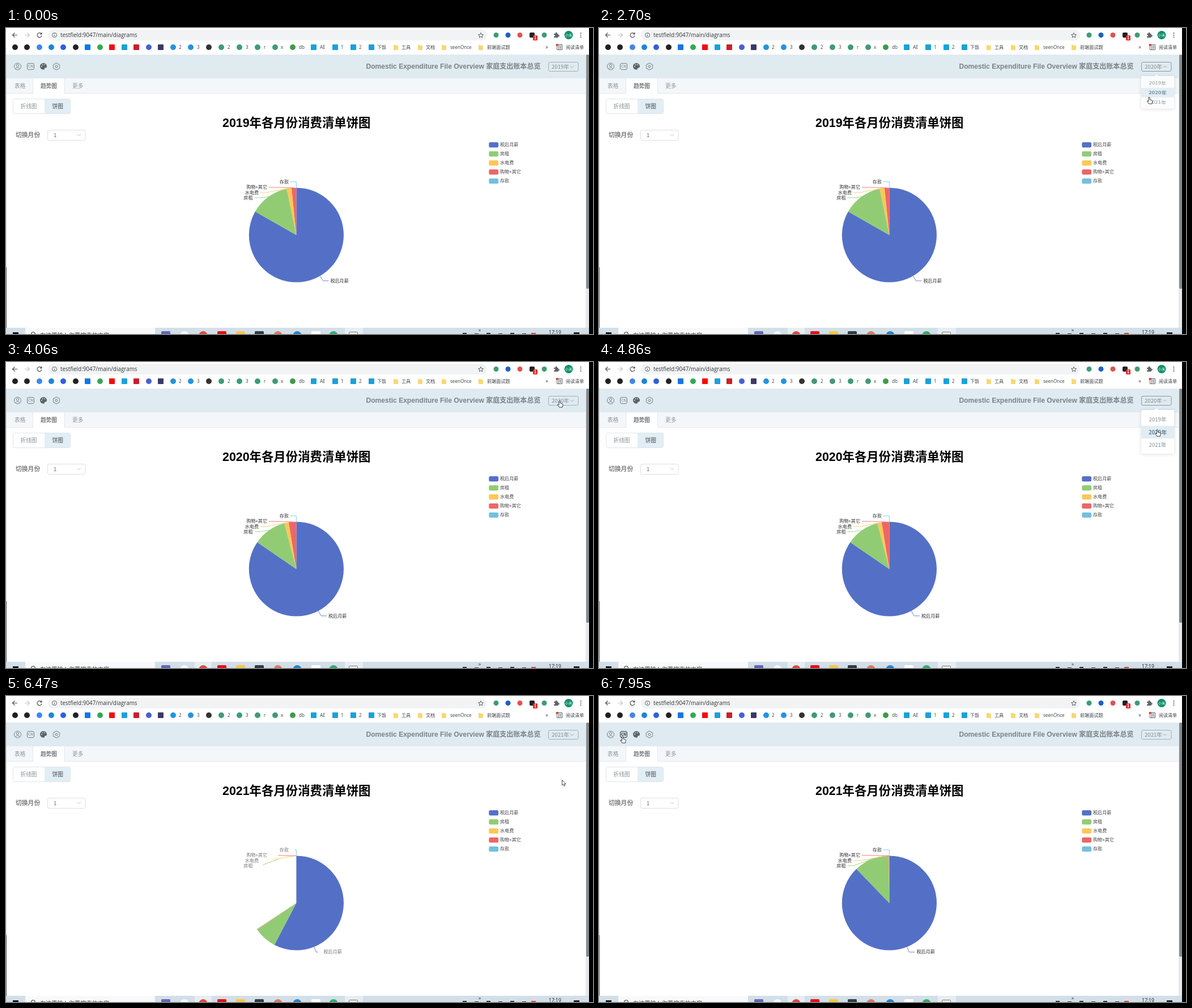
These frames come from a looping animation (1036x541 px, 8 s). An HTML page with a canvas:

```html
<!DOCTYPE html>
<html lang="zh-CN">
<head>
<meta charset="utf-8">
<title>消费饼图</title>
<style>
html, body { margin: 0; width: 100%; height: 100%; overflow: hidden; background: #fff; }
canvas { display: block; }
</style>
</head>
<body>
<canvas id="stage" width="1036" height="541"></canvas>
<script>
const g = document.getElementById('stage').getContext('2d');
const LOOP = 8000;
const CJK = '"Noto Sans CJK SC", "Noto Sans CJK JP", sans-serif';
const ARIAL = '"Liberation Sans", ' + CJK;
const UI = '"Open Sans", ' + CJK;
const GREY = '#767d82';

// ---------- helpers ----------
// y is the visual middle of the line
function text(s, x, y, size, color, { bold, align = 'left', font = CJK } = {}) {
  g.font = `${bold ? 'bold ' : ''}${size}px ${font}`;
  g.textAlign = align;
  g.fillStyle = color;
  g.fillText(s, x, y + size * 0.37);
}
function rect(x, y, w, h, fill, r = 0, stroke) {
  g.beginPath();
  g.roundRect(x, y, w, h, r);
  paint(fill, stroke);
}
function disc(x, y, r, fill, stroke, width) {
  g.beginPath();
  g.arc(x, y, r, 0, Math.PI * 2);
  paint(fill, stroke, width);
}
function paint(fill, stroke, width = 1) {
  if (fill) { g.fillStyle = fill; g.fill(); }
  if (stroke) { g.strokeStyle = stroke; g.lineWidth = width; g.stroke(); }
}
function path(d, x, y, fill, stroke, width = 1) {
  const p = new Path2D(d);
  g.save();
  g.translate(x, y);
  if (fill) { g.fillStyle = fill; g.fill(p); }
  if (stroke) { g.strokeStyle = stroke; g.lineWidth = width; g.stroke(p); }
  g.restore();
}
const clamp = v => Math.max(0, Math.min(1, v));
const smooth = p => p * p * (3 - 2 * p);
const outQuart = p => 1 - (1 - p) ** 4;
const outQuad = p => 1 - (1 - p) ** 2;
const cubicInOut = p => p < 0.5 ? 4 * p ** 3 : 1 - 4 * (1 - p) ** 3;

// ---------- browser ----------
// icon x, colour, shape (c circle, s square, f folder), label, label x
const bookmarks = [
  [16, '#1b1f23', 'c'], [37, '#222', 'c'], [59, '#4285f4', 'c'], [80, '#1a86d9', 'c'],
  [101, '#2f5fe0', 'c'], [123, '#222', 'c'], [144, '#0f77e6', 's'], [166, '#34a853', 'c'],
  [187, '#f00d0d', 's'], [209, '#1ba1d8', 's'], [230, '#cb1f27', 's'], [252, '#4461d7', 'c'],
  [273, '#3c3a66', 's'], [295, '#2493de', 'c', '2', 305], [326, '#2493de', 'c', '3', 337],
  [358, '#333', 'c'], [380, '#3f9b76', 'c', '2', 391], [412, '#3f9b76', 'c', '3', 423],
  [444, '#3f9b76', 'c', 'r', 455], [475, '#3f9b76', 'c', 'x', 485], [506, '#3f9c46', 'c', 'db', 517],
  [543, '#1ba1d8', 's', 'AE', 554], [581, '#1ba1d8', 's', '1', 591], [613, '#1ba1d8', 's', '2', 623],
  [645, '#1ba1d8', 's', '下饭', 655], [688, '#f8d775', 'f', '工具', 698], [731, '#f8d775', 'f', '文档', 741],
  [773, '#f8d775', 'f', 'seenOnce', 784], [838, '#f8d775', 'f', '前端面试题', 849],
];

function browser() {
  rect(0, 0, 1036, 541, '#fff');
  rect(74, 3, 775, 19, '#f1f3f4', 9.5);
  path('M4.5 0H-4M0 -4L-4 0L0 4', 15.5, 12.5, null, '#4c5054', 1.2);
  path('M-4.5 0H4M0 -4L4 0L0 4', 37.5, 12.5, null, '#c2c5c8', 1.2);
  path('M3.4 -2.2A4 4 0 1 0 4 1M4 -4.5V-1.5H1', 59, 12.5, null, '#4c5054', 1.2);
  disc(85.5, 12.5, 4, null, '#5f6368', 1);
  rect(85, 12, 1, 3, '#5f6368');
  rect(85, 10, 1, 1, '#5f6368');
  text('testfield:9047/main/diagrams', 96, 12.5, 9.9, '#34373b', { font: UI });
  path('M0 -4.5L1.3 -1.5L4.5 -1.3L2 .8L2.8 4L0 2.2L-2.8 4L-2 .8L-4.5 -1.3L-1.3 -1.5Z', 838, 13, null, '#5f6368', 1);
  disc(865, 12.5, 4.5, '#3f9b76');
  disc(886, 12.5, 4.5, '#1f5fc4');
  disc(907, 12.5, 4.5, '#e05252');
  rect(924, 8, 9, 9, '#222', 2);
  rect(930, 13, 8, 9, '#e02b2b', 1.5);
  text('1', 934, 17.5, 7, '#fff', { align: 'center', bold: true });
  disc(950, 12.5, 4.5, '#3f9b76');
  path('M-4 -2H-1.4A1.6 1.6 0 1 1 1.4 -2H3.6V.4A1.5 1.5 0 1 1 3.6 3V5H-4V2.6A1.4 1.4 0 1 0 -4 .2Z', 971, 12, '#5f6368');
  disc(993, 12.5, 7.5, '#12906c');
  text('小禾', 993, 12.5, 6.2, '#fff', { align: 'center' });
  for (let i = -1; i < 2; i++) disc(1014.5, 12.5 + i * 3.6, 1, '#4c5054');

  for (const [x, color, shape, label, labelX] of bookmarks) {
    if (shape === 'c') disc(x, 34, 5, color);
    if (shape === 's') rect(x - 5, 29, 10, 10, color, 1);
    if (shape === 'f') path('M-4 -4H-.5L.5 -3H4V5H-4Z', x, 34, color);
    if (label) text(label, labelX, 34.5, 8.1, '#3c4043', { font: UI });
  }
  text('»', 952, 33.5, 10, '#4c5054', { font: UI });
  path('M-4.5 -4.5H4.5V4.5H-4.5ZM-1.5 -4.5V4.5M0 -2H3M0 0H3M0 2H3', 977, 34, null, '#5f6368', 1);
  disc(972.5, 30, 2, '#d93025');
  text('阅读清单', 988, 34.5, 8, '#3c4043');
}

function taskbar(t) {
  rect(0, 530, 1029, 11, '#d3dfe8');
  rect(34, 530, 229, 11, '#f8f9fa');
  rect(12, 538, 10, 3, '#111');
  disc(48, 541, 3.3, null, '#333', 1.1);
  text('在这里输入你要搜索的内容', 60, 543, 10.2, '#444');
  rect(598, 530, 32, 11, '#e6eef3');
  if (t > 2200) rect(333, 530, 30, 11, '#e6eef3');
  const squares = [[282, '#6467b5'], [381, '#e60f17'], [414, '#f5c84b'], [447, '#333a40'], [547, '#fff']];
  for (const [x, color] of squares) rect(x - 8, 536, 16, 9, color, 1.5);
  const discs = [[315, '#f4faf8'], [348, '#dd4b3e'], [480, '#d97a62'], [514, '#2384c8'], [578, '#35ab6b']];
  for (const [x, color] of discs) disc(x, 543.5, 7.5, color);
  rect(605.5, 537.5, 15, 9, '#eee', 1, '#777');
  text('»', 836, 534, 9, '#333', { align: 'center', font: UI });
  g.fillStyle = '#333';
  for (let i = 0; i < 6; i++) g.fillRect(806 + i * 21, 539 + i % 2, 7, 2);
  rect(927, 539, 8, 2, '#d8473d');
  text('17:19', 958, 537.5, 8.6, '#222', { font: UI });
  rect(1002, 538, 10, 3, '#222');
}

// ---------- page ----------
function chevron(x, y, flip, color) {
  path(`M-3.2 ${-1.5 * flip}L0 ${1.5 * flip}L3.2 ${-1.5 * flip}`, x, y, null, color, 0.9);
}

function page(hot) {
  rect(0, 46, 1, 377, '#d5d9dc');
  rect(0, 423, 1, 107, '#555');
  rect(1, 47, 1022, 42, '#dfebf1');
  rect(1, 89, 1022, 27, '#f4f7fa');
  rect(1, 115, 1022, 1, '#e2e7ec');
  rect(48, 89, 55, 27, '#fff');
  rect(47, 89, 1, 26, '#e2e7ec');
  rect(103, 89, 1, 26, '#e2e7ec');
  rect(1023, 47, 6, 494, '#e6e8ea');
  rect(1024, 47, 5, 414, '#858a8d', 2);
  rect(1029, 0, 7, 541, '#000');

  disc(20.5, 68, 6, null, GREY, 1);
  disc(20.5, 66.2, 2.1, null, GREY, 1);
  path('M-3.8 4.4A4.2 4.2 0 0 1 3.8 4.4', 20.5, 68, null, GREY, 1);
  const cn = hot ? '#3c4348' : GREY;
  rect(37.5, 62.5, 12, 11, hot ? '#c6d0d6' : null, 2.5, cn);
  text('CN', 43.5, 68, 6.6, cn, { align: 'center', bold: hot });
  path('M0 -6A6 5.6 0 0 1 6 0Q6 2.6 3 2.4Q1.4 2.6 2 4.2Q2 6 0 5.6A6 5.8 0 0 1 0 -6Z', 66, 68, '#5b6267');
  for (const [x, y] of [[63, 68], [64.5, 65], [68, 65]]) disc(x, y, 0.9, '#dfebf1');
  path('M-1.6 -5.8H1.6L2.6 -4L4.8 -4L6 -1.2L4.8 0L6 1.2L4.8 4L2.6 4L1.6 5.8H-1.6L-2.6 4L-4.8 4L-6 1.2L-4.8 0L-6 -1.2L-4.8 -4L-2.6 -4Z', 89, 68, null, GREY, 1);
  disc(89, 68, 2, null, GREY, 1);
  text('Domestic Expenditure File Overview 家庭支出账本总览', 943.5, 68, 12.06, '#7c8287',
    { bold: true, align: 'right', font: ARIAL });

  text('表格', 15, 102.5, 9.7, '#8f9499');
  text('趋势图', 61, 102.5, 9.7, '#757b80', { bold: true });
  text('更多', 117, 102.5, 9.7, '#8f9499');

  rect(68, 125.5, 45.5, 26, '#e2eef5', [0, 3, 3, 0]);
  rect(12.5, 125.5, 101, 26, null, 3, '#dfe5e9');
  text('折线图', 25.5, 138.5, 9.7, '#8b8f93');
  text('饼图', 81.5, 138.5, 9.7, '#7a8085', { bold: true });

  text('切换月份', 17, 189, 10.8, '#808080', { bold: true });
  rect(73.5, 180.5, 66.5, 18, '#fff', 2.5, '#dcdfe6');
  text('1', 84, 189, 9.5, '#75605c');
  chevron(129, 189, 1, '#b8bcc4');
}

// ---------- pie ----------
const names = ['税后月薪', '房租', '水电费', '购物+其它', '存款'];
const colors = ['#5470c6', '#91cc75', '#fac858', '#ee6666', '#73c0de'];
// clockwise end angle of each slice, degrees from the top
const slices = {
  2019: [299.7, 348.3, 354.2, 360, 360],
  2020: [304.5, 345.5, 350.7, 360, 360],
  2021: [316, 358.9, 359.3, 360, 360],
};
const labelEnds = [null, [438.5, 300], [449, 291], [464, 281.7], [502, 272]];
const CX = 512.4, CY = 366, R = 83.6;
const at = (deg, r) => {
  const a = deg * Math.PI / 180;
  return [CX + r * Math.sin(a), CY - r * Math.cos(a)];
};

// draws the first share k of a three-point line
function partLine([a, b, c], k, color) {
  const l1 = Math.hypot(b[0] - a[0], b[1] - a[1]);
  const l2 = Math.abs(c[0] - b[0]);
  const d = k * (l1 + l2);
  const p = clamp(d / l1), q = clamp((d - l1) / l2);
  g.beginPath();
  g.moveTo(...a);
  g.lineTo(a[0] + (b[0] - a[0]) * p, a[1] + (b[1] - a[1]) * p);
  if (q) g.lineTo(b[0] + (c[0] - b[0]) * q, b[1]);
  paint(null, color, 0.85);
}

function pie(year, k) {
  text(year + '年各月份消费清单饼图', 382, 167.5, 21.4, '#000', { bold: true, font: ARIAL });
  const rad = deg => (deg * k - 90) * Math.PI / 180;
  let from = 0;
  names.forEach((name, i) => {
    const y = 206.7 + i * 16;
    rect(852.3, y - 4.6, 16.8, 9.2, colors[i], 2.4);
    text(name, 872, y - 0.5, 8.1, '#444');

    const to = slices[year][i];
    if (to > from) {
      g.beginPath();
      g.moveTo(CX, CY);
      g.arc(CX, CY, R, rad(from), rad(to));
      paint(colors[i]);
    }
    const mid = (from + to) / 2;
    const elbow = i ? [labelEnds[i][0] + 10.3, labelEnds[i][1]] : at(mid, R + 10);
    const end = i ? labelEnds[i] : [elbow[0] + 10, elbow[1]];
    partLine([at(mid, R), elbow, end], k, colors[i]);
    g.globalAlpha = k;
    text(name, end[0] + (i ? -3 : 3), end[1] - 0.3, 8.1, '#333', { align: i ? 'right' : 'left' });
    g.globalAlpha = 1;
    from = to;
  });
}

// ---------- year select ----------
const menus = [[1640, 2680], [4420, 5890]];
const menuScale = t => menus.reduce((s, [open, close]) =>
  t < open ? s : t < close ? outQuart(clamp((t - open) / 300)) : 1 - outQuart(clamp((t - close) / 300)), 0);

function yearSelect(year, s, y) {
  rect(957.5, 60.5, 52.5, 16, null, 2.5, s > 0 ? '#8996a0' : '#a3adb4');
  text(year + '年', 963, 68.5, 9.6, '#858c92');
  chevron(999, 68.5, 1 - 2 * s, '#a3abb2');
  if (s < 0.01) return;

  const row = Math.floor((y - 90) / 22.7);
  const hover = row >= 0 && row < 3 ? row : year - 2019;
  g.save();
  g.globalAlpha = Math.min(1, s * 1.2);
  g.translate(0, 85);
  g.scale(1, s);
  g.shadowColor = 'rgba(0,0,0,.14)';
  g.shadowBlur = 6;
  g.shadowOffsetY = 1;
  rect(957, 0, 58, 77, '#fff', 2);
  g.shadowColor = 'transparent';
  path('M-4 0L0 -4L4 0Z', 984, 0.5, '#fff');
  rect(957, 5 + hover * 22.8, 58, 22.5, '#e1ecf3');
  for (let i = 0; i < 3; i++) {
    const chosen = 2019 + i === year;
    text(2019 + i + '年', 986, 16.3 + i * 22.8, 9.6, chosen ? '#5f8299' : '#858b90',
      { align: 'center', bold: chosen || i === hover });
  }
  g.restore();
}

// ---------- pointer ----------
const track = [
  [0, 1016, 546], [70, 1016, 538], [270, 1016, 536], [1010, 968, 82], [1080, 968, 82], [1210, 971, 71],
  [1740, 971, 71], [2240, 971, 122], [3150, 971, 122], [4000, 977, 68], [4520, 977, 68],
  [5060, 989, 142], [5130, 989, 142], [5260, 990.5, 145], [5980, 990.5, 145], [6470, 981.5, 148.5],
  [6540, 937, 147], [7350, 52, 87, outQuad], [7620, 41.5, 71], [LOOP, 41.5, 71],
];
const clicks = [1540, 2570, 4320, 5790, 7880];

function pointerAt(t) {
  const i = track.findIndex(k => k[0] > t);
  const [t0, x0, y0] = track[i - 1], [t1, x1, y1, ease = smooth] = track[i];
  const p = ease((t - t0) / (t1 - t0));
  return [x0 + (x1 - x0) * p, y0 + (y1 - y0) * p];
}

function pointer(t, x, y, hand) {
  if (clicks.some(c => t >= c && t < c + 70)) disc(x - 0.5, y + 1, 8.5, 'rgba(240,225,50,.75)');
  if (hand) {
    path('M-1.1 1Q0 -.8 1.1 1V4.8L5 5.8Q6.2 6.4 5.8 8.2L5 12H-.5L-3.4 8Q-3.6 6.4 -2.4 6.8L-1.1 8Z', x, y, '#fff', '#222', 0.9);
  } else {
    path('M0 0V9.4L2.2 7.5L3.7 10.8L5.1 10.2L3.7 7H6.6Z', x, y, '#fff', '#222', 0.8);
  }
}

// ---------- frame ----------
function draw(now) {
  const t = now % LOOP;
  const [x, y] = pointerAt(t);
  const s = menuScale(t);
  const inside = (l, top, r, b) => x >= l && x <= r && y >= top && y <= b;
  const onIcon = inside(35, 60, 51, 76);
  const picked = t < 2640 ? 2019 : t < 5860 ? 2020 : 2021;
  const [shown, start] = t < 2710 ? [2019, -1000] : t < 5912 ? [2020, 2710] : [2021, 5912];

  browser();
  page(onIcon && t >= 7880);
  pie(shown, cubicInOut(clamp((t - start) / 1000)));
  yearSelect(picked, s, y);
  taskbar(t);
  pointer(t, x, y, onIcon || inside(957, 60, 1010, 77) || (s > 0.3 && inside(957, 60, 1015, 162)));
  requestAnimationFrame(draw);
}
requestAnimationFrame(draw);
</script>
</body>
</html>
```
